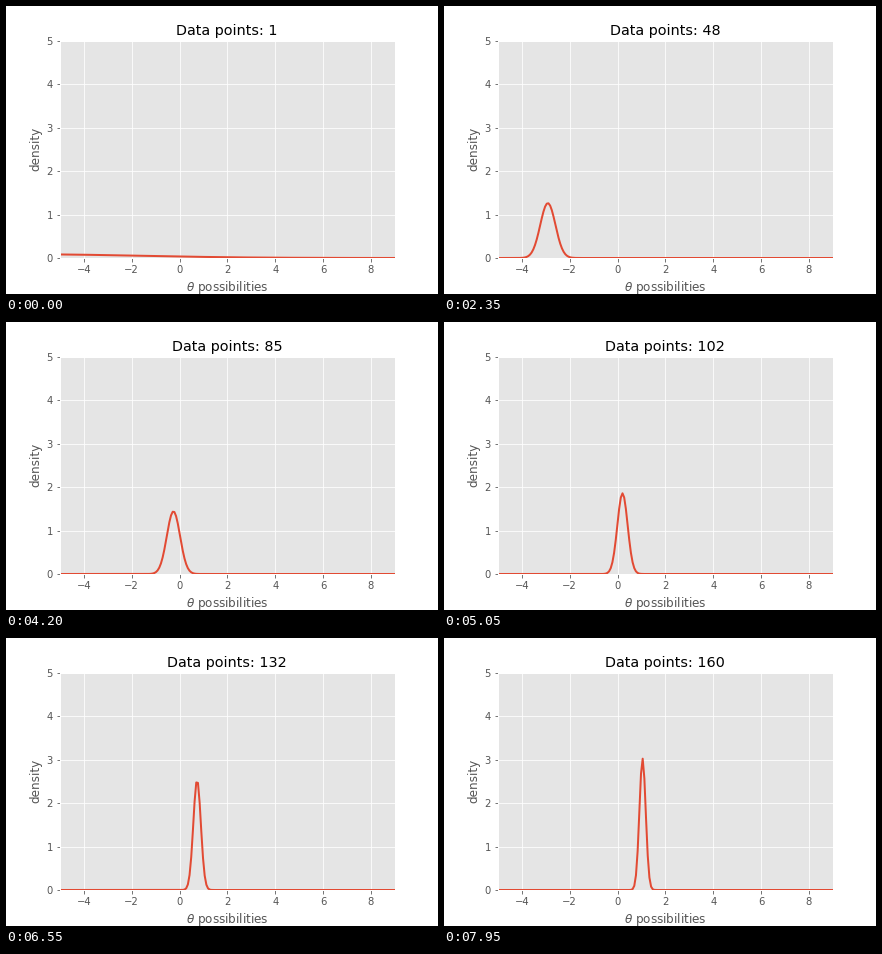
Write a matplotlib script that moves like this. It is 432 px wide and 288 px high and loops after 8000 ms.

```python
import numpy as np
import matplotlib.pyplot as plt
from matplotlib.animation import FuncAnimation

plt.style.use("ggplot")
plt.rcParams["font.family"] = "DejaVu Sans"

FRAMES = 160
THETA = np.linspace(-5, 9, 200)
LOG_COUNTS = np.log([1, 31, 65, 85, 119, 160])
LOG_SPREADS = np.log([4.7, 0.273, 0.35, 0.277, 0.1735, 0.132])


def mean(n):
    """Steady climb at first, then a running mean settling towards 2.52."""
    return 0.0728 * n - 6.41 if n < 84 else 2.52 - 236 / n


def spread(n):
    """Power laws between the key counts."""
    return np.exp(np.interp(np.log(n), LOG_COUNTS, LOG_SPREADS))


def density(mu, sigma):
    z = (THETA - mu) / sigma
    return np.exp(-z * z / 2) / (sigma * np.sqrt(2 * np.pi))


fig, ax = plt.subplots(figsize=(6, 4), dpi=72)
fig.subplots_adjust(left=0.125, right=0.9, bottom=0.125, top=0.88)
ax.set_xlim(-5, 9)
ax.set_ylim(0, 5)
ax.set_xticks(range(-4, 9, 2))
ax.set_yticks(range(6))
ax.set_xlabel(r"$\theta$ possibilities")
ax.set_ylabel("density")
title = ax.set_title("", x=0.4992)
curve, = ax.plot([], [], color="#E24A33", lw=2)


def update(i):
    n = i + 1
    curve.set_data(THETA, density(mean(n), spread(n)))
    title.set_text(f"Data points: {n}")
    return curve, title


anim = FuncAnimation(fig, update, frames=FRAMES, interval=50,
                     repeat=True, repeat_delay=0, blit=False)
plt.show()
```
